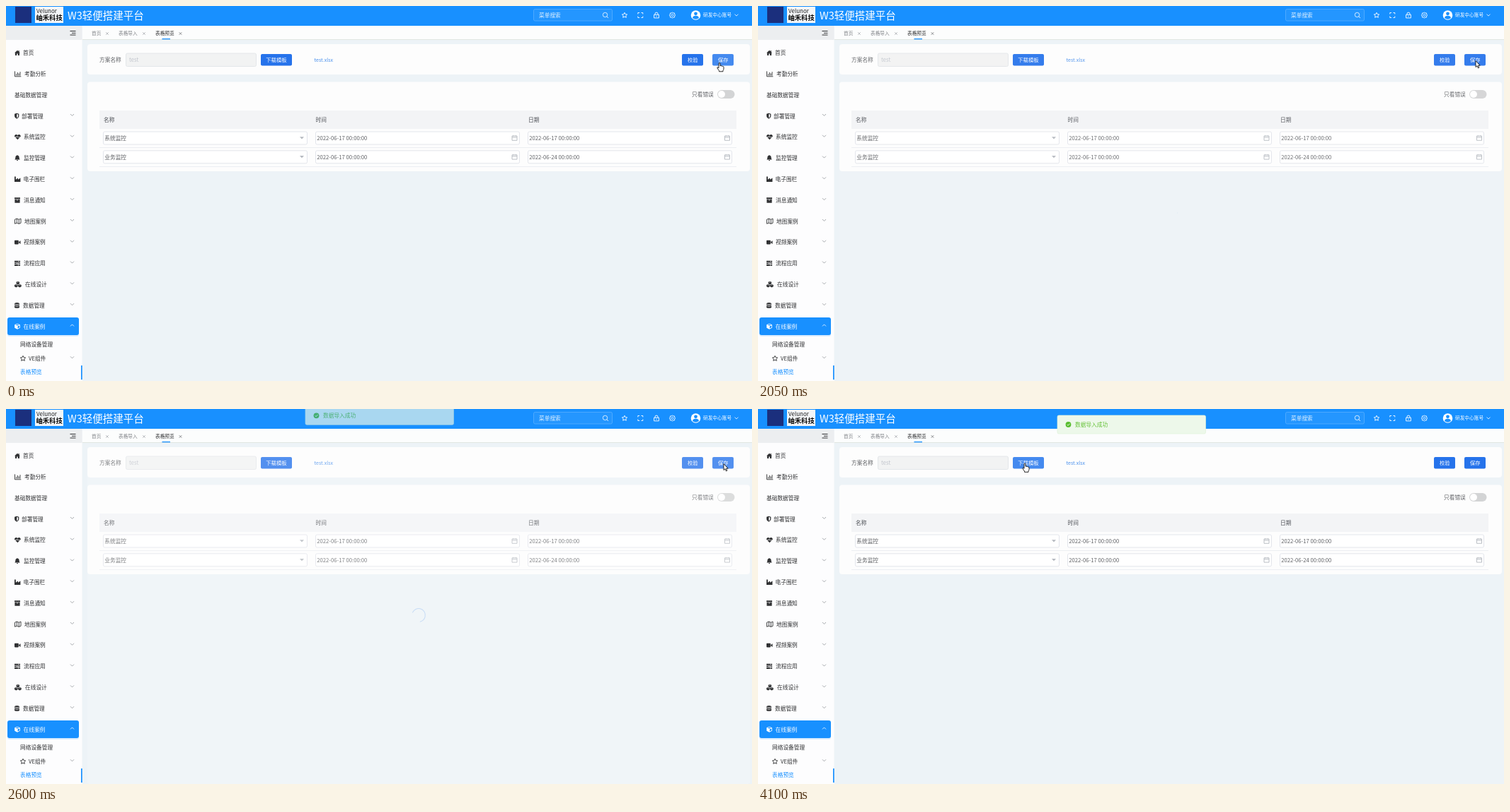
An HTML page for the animation above (4950 ms loop, 1054x531 px).

```html
<!DOCTYPE html>
<html lang="zh-CN">
<head>
<meta charset="utf-8">
<title>表格预览</title>
<style>
html, body { margin: 0; width: 100%; height: 100%; overflow: hidden; background: #edf3f7; }
svg { display: block; position: absolute; left: 0; top: 0; }
text { font-family: "Noto Sans CJK SC", "Noto Sans CJK", "Noto Sans", sans-serif; white-space: pre; }
</style>
</head>
<body>
<svg id="stage" width="1054" height="531" viewBox="0 0 1054 531"></svg>
<script>
const LOOP = 4950, STEP = 50;
const BLUE = '#1890ff', BUTTON = '#2673eb', HOVER = '#448aef', INK = '#303133', GREY = '#606266';
const stage = document.getElementById('stage');

// ---- drawing helpers ----
function add(parent, tag, attrs, content) {
  const el = document.createElementNS('http://www.w3.org/2000/svg', tag);
  for (const key in attrs) el.setAttribute(key, attrs[key]);
  if (content) el.textContent = content;
  return parent.appendChild(el);
}
const group = (parent = stage) => add(parent, 'g', {});
const rect = (p, x, y, width, height, fill, rx = 0, more = {}) =>
  add(p, 'rect', { x, y, width, height, fill, rx, ...more });
const circle = (p, cx, cy, r, fill, more = {}) => add(p, 'circle', { cx, cy, r, fill, ...more });
// Text is placed by its left edge and vertical centre.
const label = (p, x, cy, str, fill = INK, size = 7.7, more = {}) =>
  add(p, 'text', { x, y: cy + size * 0.37, fill, 'font-size': size, ...more }, str);
const line = (p, d, stroke, width = 0.8, more = {}) =>
  add(p, 'path', { d, fill: 'none', stroke, 'stroke-width': width, ...more });
const chevron = (p, x, y, color, up = false) =>
  line(p, up ? `M${x - 2.5} ${y + 1.2}l2.5-2.5 2.5 2.5` : `M${x - 2.5} ${y - 1.2}l2.5 2.5 2.5-2.5`, color);
const cross = (p, x, y, color) => line(p, `M${x - 1.8} ${y - 1.8}l3.6 3.6m0-3.6l-3.6 3.6`, color, 0.7);

// Icons live in a box of about 9 by 9, centred on y.
function icon(p, name, x, cy, color = '#2b2d31') {
  const [style, d] = ICONS[name];
  const paint = style === 'fill' ? { fill: color, 'fill-rule': 'evenodd' }
    : { fill: 'none', stroke: color, 'stroke-width': 0.9 };
  add(p, 'path', { d, transform: `translate(${x} ${cy - 4.5})`, ...paint });
}
const ICONS = {
  home: ['fill', 'M0 4.6L4 1l1.6 1.4V1.2h1.1v2.2L8 4.6H7v3.7H4.8V5.6H3.2v2.7H1V4.6z'],
  chart: ['line', 'M.5 .8v7.4h8.8M2.6 7V4.6M4.4 7V2.4M6.2 7V3.8M8 7V1.6'],
  shield: ['fill', 'M3.2 .6L6.3 1.6V5Q6 7.4 3.2 8.5Q.4 7.4 .1 5V1.6zM3.3 1.7V7.3Q5 6.5 5.1 4.8V2.3z'],
  pulse: ['fill', 'M4.4 8.3L1.2 5h1.9l.8-1.4 1.1 2.2.6-1.1h2L4.4 8.3zM0 4.3Q-.2 1 2.3 .9Q3.8 1 4.4 2.1Q5 1 6.5 .9Q9 1 8.7 4.3H5.3L5 4.8 3.9 2.6 2.9 4.3z'],
  bell: ['fill', 'M4 .4Q6.7 1 6.7 4.2Q6.8 5.7 7.7 6.8H.3Q1.2 5.7 1.3 4.2Q1.3 1 4 .4zM3 7.3H5Q4.8 8.5 4 8.5Q3.2 8.5 3 7.3z'],
  factory: ['fill', 'M0 8.3V.9h1.8v4.2L5 3v2.1L8.4 3v5.3z'],
  archive: ['fill', 'M0 .8h8v2H0zM.4 3.3h7.2v5H.4zM2.8 4.1v.8h2.4v-.8z'],
  map: ['line', 'M.5 2l2.8-1.1 2.9 1.2L9 .9v6.2L6.2 8.2 3.3 7 .5 8.1zM3.3 .9V7M6.2 2.1v6.1'],
  video: ['fill', 'M0 2.6Q0 1.8 .8 1.8H5q.8 0 .8 .8V6.6q0 .8-.8 .8H.8Q0 7.400 0 6.600zM6.2 4L8.500 2.200V7L6.200 5.300z'],
  flow: ['fill', 'M0 1h8v1.900H0zM0 3.600h8v1.900H0zM0 6.200h8v1.900H0zM5 1.600v.600h2v-.600zM2.500 4.200v.600H7v-.600zM4.500 6.800v.600H7v-.600z'],
  cubes: ['fill', 'M4.800 .200L7 1.200V3.700L4.800 4.800 2.600 3.700V1.200zM2.300 4.200L4.600 5.300V7.700L2.300 8.800 0 7.700V5.300zM7.400 4.200L9.700 5.300V7.700L7.400 8.800 5.100 7.700V5.300zM4.800 1L3.600 1.500l1.200.500L6 1.500zM2.300 5L1.200 5.500l1.100.500 1.100-.500zM7.400 5l-1.100.500 1.100.500 1.100-.500z'],
  data: ['fill', 'M0 1.600Q3.500-.500 7 1.600V2.400Q3.500 4 0 2.400zM0 3.200Q3.500 4.800 7 3.200V4.500Q3.500 6 0 4.500zM0 5.300Q3.500 6.900 7 5.300V7.600Q3.500 9.300 0 7.600z'],
  cube: ['fill', 'M4 .500L7.800 2V6.600L4 8.500 .200 6.600V2zM4 1.300L1.500 2.300 4 3.300 6.500 2.300zM4.500 4.200V7.300L7 6V3.200z'],
  star: ['line', 'M4 .800L5.100 3.100 7.700 3.500 5.800 5.200 6.300 7.800 4 6.600 1.700 7.800 2.200 5.200 .300 3.500 2.900 3.100z'],
  expand: ['line', 'M.500 3V1H2.800M5.200 1H7.500V3M7.500 6V8H5.200M2.800 8H.500V6'],
  lock: ['line', 'M.600 3.800H7.400V8.400H.600zM2 3.800V2.500Q2 .600 4 .600T6 2.500V3.800M4 5.300V6.800'],
  gear: ['line', 'M4 .600L5.300 1.400 7 1.500 7.200 3.200 8 4.500 7.200 5.800 7 7.500 5.300 7.600 4 8.400 2.700 7.600 1 7.500 .800 5.800 0 4.500 .800 3.200 1 1.500 2.700 1.400zM4 3A1.500 1.500 0 1 1 3.990 3z'],
  calendar: ['line', 'M.500 1.500H7.500V7.800H.500zM.500 3.500H7.500M2.300 .800V2M5.700 .800V2'],
};

// ---- header ----
function drawHeader(g) {
  rect(g, 0, 0, 1054, 28, BLUE);
  rect(g, 13, 1, 23, 23, '#1b2f7d');
  rect(g, 41, 1, 40, 23, '#f4f6f8');
  label(g, 43, 7, 'Velunor', '#222', 8, { 'font-family': 'Liberation Mono, monospace' });
  label(g, 42.500, 17, '岫禾科技', '#111', 9.300, { 'font-weight': 700 });
  label(g, 87, 13.500, 'W3轻便搭建平台', '#fff', 14.500);
  rect(g, 745.500, 4.500, 111, 16.500, '#2496ff', 2, { stroke: '#58afff', 'stroke-width': 0.8 });
  label(g, 753, 13, '菜单搜索', '#e3f2ff');
  circle(g, 846.500, 12.500, 3.200, 'none', { stroke: '#fff', 'stroke-width': 0.8 });
  line(g, 'M849 15l2 2', '#fff');
  [['star', 870], ['expand', 892.300], ['lock', 915], ['gear', 937.500]]
    .forEach(([name, x]) => icon(g, name, x, 13, '#fff'));
  circle(g, 974.500, 13, 6.800, '#fff');
  circle(g, 974.500, 10.800, 2.400, BLUE);
  add(g, 'path', { d: 'M970 17Q970.500 13.800 974.500 13.800T979 17Q977 18.800 974.500 18.800T970 17z', fill: BLUE });
  label(g, 985, 13, '研发中心账号', '#fff', 6.700);
  chevron(g, 1032, 12.800, '#fff');
}

// ---- sidebar ----
const MENU = [
  ['home', '首页', 24], ['chart', '考勤分析', 26], ['', '基础数据管理', 12], ['shield', '部署管理', 22],
  ['pulse', '系统监控', 25], ['bell', '监控管理', 25], ['factory', '电子围栏', 24.500], ['archive', '消息通知', 25],
  ['map', '地图案例', 26], ['video', '视频案例', 25], ['flow', '流程应用', 25], ['cubes', '在线设计', 27],
  ['data', '数据管理', 24], ['cube', '在线案例', 24.500],
];
function drawSidebar(g) {
  rect(g, 0, 28, 107.500, 503, '#fdfdfe');
  rect(g, 0, 28, 107.500, 20, '#eceef0');
  line(g, 'M90.500 35.500h8M93 38.300h5.500M90.500 41h8', INK, 1);
  rect(g, 2, 442, 101, 26, '#1890ff', 3, { opacity: 0.15 });
  rect(g, 2, 441, 101, 25, BLUE, 3);
  MENU.forEach(([name, title, x], i) => {
    const y = 66.300 + 29.800 * i, active = i === MENU.length - 1;
    const color = active ? '#fff' : INK;
    if (name) icon(g, name, 12, y, color);
    label(g, x, y, title, color);
    if (i > 2) chevron(g, 93.500, y - 1.500, active ? '#fff' : '#909399', active);
  });
  label(g, 20, 479, '网络设备管理');
  icon(g, 'star', 20, 499, INK);
  label(g, 32, 499, 'VE组件');
  chevron(g, 93.500, 497.500, '#909399');
  label(g, 20, 518.500, '表格预览', BLUE);
  rect(g, 106, 509, 1.700, 20, BLUE);
}

// ---- tabs and page ----
function drawTabs(g) {
  rect(g, 108, 28, 946, 19, '#fcfdfd');
  rect(g, 108, 47, 946, 0.800, '#dfe4dc');
  label(g, 121, 38.500, '首页', '#808388', 6.700);
  label(g, 159, 38.500, '表格导入', '#808388', 6.700);
  label(g, 211, 38.500, '表格预览', INK, 6.700);
  cross(g, 143, 39, '#a0a3a8');
  cross(g, 195, 39, '#a0a3a8');
  cross(g, 246.500, 39, '#606266');
  rect(g, 220.500, 46, 11.500, 1.300, BLUE);
}
function button(g, x, width, title, textX, size) {
  const face = rect(g, x, 68, width, 16.500, BUTTON, 2);
  label(g, textX, 76.500, title, '#fff', size);
  return face;
}
function field(g, x, cy, width, value) {
  rect(g, x + 0.500, cy - 9, width - 1, 18, '#fff', 2, { stroke: '#dcdfe6', 'stroke-width': 0.8 });
  label(g, x + 2.300, cy, value, GREY);
}
function drawPage(g) {
  rect(g, 115, 54, 936, 43, '#fdfdfd', 4);
  rect(g, 115, 107.500, 936, 126.500, '#fdfdfd', 4);
  label(g, 132, 76, '方案名称', GREY);
  rect(g, 169.500, 67, 184, 18.500, '#f2f3f3', 2, { stroke: '#dfe2e6', 'stroke-width': 0.8 });
  label(g, 174, 76.500, 'test', '#c0c4cc');
  label(g, 435.500, 76, 'test.xlsx', '#4a90ec', 7);
  label(g, 969, 125, '只看错误', GREY);
  rect(g, 1005, 119, 24.500, 12, '#d3d4d5', 6);
  circle(g, 1011, 125, 5, '#fff');
  rect(g, 132, 148, 900, 26, '#f3f4f6');
  [[138, '名称'], [437.500, '时间'], [738, '日期']]
    .forEach(([x, title]) => label(g, x, 161, title, '#4c4f55', 7.700, { 'font-weight': 500 }));
  [[187, '系统监控', '17'], [213.800, '业务监控', '24']].forEach(([y, name, day]) => {
    field(g, 137, y, 289, name);
    add(g, 'path', { d: `M415 ${y - 1.800}h6l-3 3.300z`, fill: '#b4b8bf' });
    field(g, 437, y, 289, '2022-06-17 00:00:00');
    field(g, 737, y, 289, `2022-06-${day} 00:00:00`);
    icon(g, 'calendar', 714.500, y, '#b4b8bf');
    icon(g, 'calendar', 1015, y, '#b4b8bf');
    rect(g, 132, y + 13.300, 900, 0.700, '#e6e9ee');
  });
  return {
    download: button(g, 360, 44, '下载模板', 367.200, 7.400),
    check: button(g, 955, 30, '校验', 963, 7.200),
    save: button(g, 998, 30, '保存', 1006, 7.300),
  };
}

drawTabs(group());
const buttons = drawPage(group());

const mask = group();
rect(mask, 115, 54, 936, 477, '#fff', 4, { opacity: 0.9 });
const spinner = circle(mask, 0, 0, 20, 'none', { stroke: '#4a90ec', 'stroke-width': 2.200, 'stroke-linecap': 'round' });

drawSidebar(group());
drawHeader(group());

const toast = group();
rect(toast, 423, 0, 209.500, 26, '#edf8ea', 2, { stroke: '#dff1d8', 'stroke-width': 0.7 });
circle(toast, 438.500, 13, 3.900, '#58bd2f');
line(toast, 'M436.700 13l1.400 1.400 2.400-2.700', '#fff', 0.9);
label(toast, 448, 13, '数据导入成功', '#67c23a');

// Both pointers have their hot spot at 0,0.
const outline = { fill: '#fff', stroke: '#111', 'stroke-width': 0.9, 'stroke-linejoin': 'round' };
const hand = add(stage, 'path', { ...outline,
  d: 'M-1 1Q0-.300 1 1V4.700Q2 4 2.800 5Q3.800 4.500 4.500 5.500Q5.800 5.200 6 6.600V9.200Q5.800 10.500 5 11.300V12.800H-.500V11.600L-3 8Q-3.500 6.600-2.200 6.700L-1 7.800z' });
const arrow = add(stage, 'path', { ...outline, d: 'M0 0V9L2 7.200 3.400 10.400 4.800 9.800 3.500 6.700H6.200z' });

// ---- motion ----
function bezier(x1, y1, x2, y2) {
  const at = (a, b, u) => 3 * a * u * (1 - u) ** 2 + 3 * b * u * u * (1 - u) + u ** 3;
  return x => {
    if (x <= 0 || x >= 1) return x <= 0 ? 0 : 1;
    let low = 0, high = 1;
    for (let i = 0; i < 24; i++) {
      const mid = (low + high) / 2;
      if (at(x1, x2, mid) < x) low = mid; else high = mid;
    }
    return at(y1, y2, low);
  };
}
const ease = bezier(0.25, 0.1, 0.25, 1), easeInOut = bezier(0.42, 0, 0.58, 1);

const MASK_IN = 2025, MASK_OUT = 2460, TOAST_IN = 2480;
const POINTER = [
  [0, 1008, 80], [50, 1008, 80], [350, 1016, 100], [700, 1032, 108], [1100, 1030, 86],
  [1200, 1021, 82], [1350, 1014, 77.500], [3450, 1014, 77.500], [3500, 1013, 86], [3600, 940, 108],
  [3800, 620, 110], [3950, 385, 86], [4000, 355, 76], [4050, 368, 74], [4100, 377, 76.500], [LOOP, 377, 76.500],
];
function pointerAt(t) {
  const i = POINTER.findIndex(p => p[0] > t);
  const [t0, x0, y0] = POINTER[i - 1], [t1, x1, y1] = POINTER[i];
  const k = (t - t0) / (t1 - t0);
  return [x0 + (x1 - x0) * k, y0 + (y1 - y0) * k];
}

function drawSpinner(ms) {
  const phase = (ms % 1500) / 750;
  const grow = easeInOut(Math.min(phase, 1)), chase = easeInOut(phase - 1);
  spinner.setAttribute('stroke-dasharray', `${1 + 89 * grow} ${200 - 50 * grow}`);
  spinner.setAttribute('stroke-dashoffset', -40 * grow - 80 * chase);
  spinner.setAttribute('transform', `translate(583 292) rotate(${ms * 0.18}) scale(.47)`);
}

function render(t) {
  const shown = ease((t - MASK_IN) / 300) - ease((t - MASK_OUT) / 300);
  mask.setAttribute('opacity', shown);
  drawSpinner(Math.max(0, t - MASK_IN));

  toast.setAttribute('opacity', ease((t - TOAST_IN) / 300));
  toast.setAttribute('transform', `translate(0 ${-17 + 26 * ease((t - TOAST_IN) / 400)})`);

  const [x, y] = pointerAt(t);
  const blocked = t >= MASK_IN && t < 2900;
  let pointing = false;
  for (const face of Object.values(buttons)) {
    const left = +face.getAttribute('x'), right = left + +face.getAttribute('width');
    const over = !blocked && x >= left && x <= right && y >= 68 && y <= 84.500;
    face.setAttribute('fill', over ? HOVER : BUTTON);
    pointing = pointing || over;
  }
  hand.setAttribute('visibility', pointing ? 'visible' : 'hidden');
  arrow.setAttribute('visibility', pointing ? 'hidden' : 'visible');
  hand.setAttribute('transform', `translate(${x} ${y})`);
  arrow.setAttribute('transform', `translate(${x} ${y})`);
}

const start = performance.now();
function tick() {
  const t = (performance.now() - start) % LOOP;
  render(Math.floor(t / STEP) * STEP);
  requestAnimationFrame(tick);
}
tick();
</script>
</body>
</html>
```
